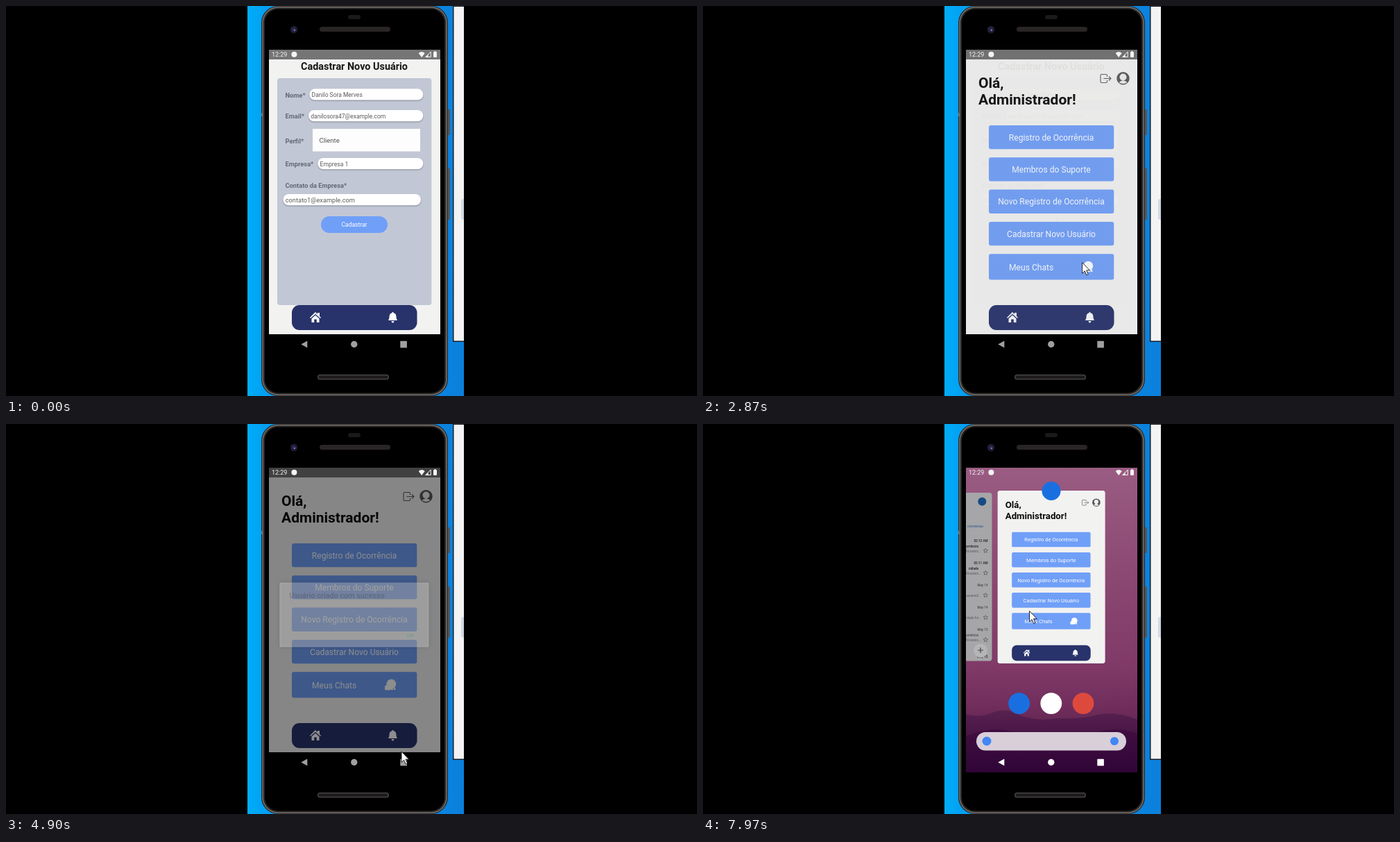
An HTML page with a canvas that plays this animation: 996x562 px, repeating every 8000 ms.

```html
<!DOCTYPE html>
<html lang="pt">
<head>
<meta charset="utf-8">
<style>
  html, body { margin: 0; width: 100%; height: 100%; overflow: hidden; background: #000; }
  canvas { display: block; }
</style>
</head>
<body>
<canvas id="stage" width="996" height="562"></canvas>
<script>
const c = document.getElementById('stage').getContext('2d');
const LOOP = 8000;
const BLUE = '#709ff8', NAVY = '#28326b', PAPER = '#f2f2f1';

const clamp = v => Math.max(0, Math.min(1, v));
const ramp = (t, a, b) => clamp((t - a) / (b - a));
const smooth = v => v * v * (3 - 2 * v);
const easeOut = v => 1 - (1 - v) ** 3;
const mix = (a, b, p) => a + (b - a) * p;

function box(x, y, w, h, r, fill) {
  c.beginPath();
  c.roundRect(x, y, w, h, r);
  c.fillStyle = fill;
  c.fill();
}
function disc(x, y, r, fill) {
  c.beginPath();
  c.arc(x, y, r, 0, 7);
  c.fillStyle = fill;
  c.fill();
}
function shape(d, x, y, fill, stroke, width = 1) {
  const path = new Path2D(d);
  c.save();
  c.translate(x, y);
  if (fill) { c.fillStyle = fill; c.fill(path); }
  if (stroke) { c.strokeStyle = stroke; c.lineWidth = width; c.stroke(path); }
  c.restore();
}
function text(str, x, y, size, color, weight = 400, align = 'left') {
  c.font = `${weight} ${size}px Roboto, sans-serif`;
  c.textAlign = align;
  c.fillStyle = color;
  c.fillText(str, x, y);
}
function faded(alpha, draw) {
  if (alpha <= 0) return;
  c.save();
  c.globalAlpha *= alpha;
  draw();
  c.restore();
}
function clipped(x, y, w, h, draw) {
  c.save();
  c.beginPath();
  c.rect(x, y, w, h);
  c.clip();
  draw();
  c.restore();
}
function gradient(x0, y0, x1, y1, ...stops) {
  const g = c.createLinearGradient(x0, y0, x1, y1);
  stops.forEach(([at, color]) => g.addColorStop(at, color));
  return g;
}

function desktop() {
  c.fillStyle = '#000';
  c.fillRect(0, 0, 996, 562);
  c.fillStyle = gradient(348, 0, 660, 0, [0, '#00adf7'], [.08, '#03a0f2'], [1, '#0b80dc']);
  c.fillRect(348, 0, 312, 562);
  c.fillStyle = '#151c26';
  c.fillRect(644, 0, 16, 484);
  c.fillStyle = '#f3f3f3';
  c.fillRect(645.5, 1, 14.5, 481.5);
  box(656, 278, 4, 30, [3, 0, 0, 3], '#d3d9e4');
}

function phone() {
  box(635, 149, 5, 37, 1, '#55575b');
  box(635, 234, 5, 74, 1, '#55575b');
  box(368, 0, 269, 562, 24, '#2b2929');
  box(369.3, 1, 266.4, 560, 23, '#77736f');
  box(370.8, 2.5, 263.4, 557, 21.5, '#2a2827');
  box(373, 4.5, 259, 553, 19.5, '#000');
  c.fillStyle = '#6b6b6b';
  c.fillRect(368, 154, 2, 5);
  box(493, 13, 18, 6, 3, '#1b191a');
  box(452, 30, 102, 7, 3.5, '#2a2525');
  disc(415, 34, 5.5, '#1a1a2b');
  disc(415, 34, 3, '#2c2a55');
  disc(416, 35, 1, '#8c96c8');
  box(449, 531, 103, 7.5, 3.5, '#454242');
  box(450.5, 532.5, 100, 4.5, 2, '#1d1b1b');
}

function tabBar() {
  box(412, 431, 180.5, 36, 11, NAVY);
  shape('M0 8L8 0L11 3V1H14V6L16 8L15 9L8 2.8L1 9ZM2.5 9.5L8 4.5L13.5 9.5V15H9.8V10.5H6.2V15H2.5Z', 438, 441, '#fff');
  shape('M7 0C7.8 0 8 .6 8 1.3C11 2 12 4 12 7C12 10 13 10.5 13.5 12H.5C1 10.5 2 10 2 7C2 4 3 2 6 1.3C6 .6 6.2 0 7 0ZM5 13H9Q8.8 15.5 7 15.5Q5.2 15.5 5 13Z', 550.5, 441, '#fff');
}

function field(label, x, y, w, value, size = 8.5) {
  c.save();
  c.shadowColor = 'rgba(60,65,85,.5)';
  c.shadowBlur = 2;
  c.shadowOffsetY = 1;
  box(x, y, w, 16.3, 8, '#fff');
  c.restore();
  text(label, 402.5, y + 12.4, 9.3, '#626977', 700);
  text(value, x + 3.3, y + 12, size, '#5c5c5c');
}

function spinner(t) {
  const turn = t - 2000;
  const phase = ((turn / 1333) % 1 + 1) % 1;
  const head = smooth(ramp(phase, .5, 1)), tail = smooth(ramp(phase, 0, .5));
  const spin = Math.floor(turn / 1333) * 4.5 + turn / 1333 * 1.35;
  c.beginPath();
  c.arc(502, 304.5, 8.3, spin + .9 + tail * 4.5, spin + 5.45 + head * 4.5);
  c.strokeStyle = '#747881';
  c.lineWidth = 2;
  c.stroke();
}

function formScreen(t) {
  c.fillStyle = PAPER;
  c.fillRect(379, 77, 247, 396);
  text('Cadastrar Novo Usuário', 502, 92, 14.4, '#161616', 700, 'center');
  box(391, 104, 222.3, 327, 4, '#c2c7d5');
  field('Nome*', 437.3, 119.3, 164, 'Danilo Sora Merves');
  field('Email*', 436, 150, 165.3, 'danilosora47@example.com');
  text('Perfil*', 402.5, 197.5, 9.3, '#626977', 700);
  box(442, 177, 155, 32.5, 0, '#fdfdfd');
  text('Cliente', 451.5, 197.3, 9.5, '#505050');
  field('Empresa*', 449.3, 219, 152, 'Empresa 1', 8.6);
  text('Contato da Empresa*', 402.5, 262.3, 9.3, '#626977', 700);
  field('', 399.5, 271, 198.5, 'contato1@example.com', 9.2);
  if (t < 1300) {
    faded(1 - .7 * ramp(t, 1120, 1250), () => {
      box(454, 303, 96, 24, 12, BLUE);
      text('Cadastrar', 502, 318, 8.5, '#fff', 400, 'center');
    });
  } else spinner(t);
  tabBar();
}

function homeScreen() {
  c.fillStyle = PAPER;
  c.fillRect(379, 77, 247, 396);
  text('Olá,', 397, 117.5, 21, '#0b0b0b', 700);
  text('Administrador!', 397, 142, 21, '#0b0b0b', 700);
  shape('M10 4V2Q10 .5 8.5 .5H2Q.5 .5 .5 2V11Q.5 12.5 2 12.5H8.5Q10 12.5 10 11V9M5 6.5H15.5M12.5 3.5L15.5 6.5L12.5 9.5', 572.5, 98, null, '#5c5c5c', 1.1);
  disc(605.5, 104.3, 9.2, '#55565b');
  disc(605.5, 102.5, 5, PAPER);
  shape('M-6 7Q0 1.5 6 7Q0 11 -6 7Z', 605.5, 103, PAPER);
  const labels = ['Registro de Ocorrência', 'Membros do Suporte', 'Novo Registro de Ocorrência', 'Cadastrar Novo Usuário'];
  labels.forEach((label, i) => {
    const y = 172 + i * 46.3;
    box(412, y, 180.3, 34.3, 3, BLUE);
    text(label, 502, y + 21.7, 12.1, '#fff', 400, 'center');
  });
  box(412, 357.2, 180.3, 37.3, 3, BLUE);
  text('Meus Chats', 441, 380.7, 12.1, '#fff');
  disc(555.3, 374.7, 6.9, '#fff');
  shape('M0 8.5V3L4 1L14 9V8L16 8.5L14 4L12 8.5Q10 9 8 8.2Q7 9.5 4 9Q2 9 0 8.5Z', 546, 374.5, '#fff');
  tabBar();
}

function dialog() {
  c.save();
  c.shadowColor = 'rgba(0,0,0,.5)';
  c.shadowBlur = 5;
  box(394.3, 228.5, 215.2, 93, 1.5, '#fdfdfd');
  c.restore();
  text('Usuário criado com sucesso', 408.5, 251, 10.8, '#333', 500);
  text('OK', 577.3, 307.3, 8, '#2a8f80', 500);
}

function wallpaper() {
  c.fillStyle = gradient(0, 63, 0, 502, [0, '#9a5c82'], [.4, '#894670'], [.65, '#803a68'], [.78, '#712e5c'], [1, '#45123f']);
  c.fillRect(379, 63, 247, 439);
  shape('M0 418Q20 424 38 416Q60 408 78 420Q105 429 130 424Q165 426 190 419Q215 413 247 426V502H0Z', 379, 0,
    gradient(0, 408, 0, 502, [0, '#5a2351'], [.5, '#451344'], [1, '#320539']));
  shape('M0 450Q40 432 75 446Q125 466 170 450Q215 432 247 446V502H0Z', 379, 0,
    gradient(0, 435, 0, 502, [0, '#430f42'], [1, '#300537']));
}

function mailCard(shift) {
  c.save();
  c.translate(shift, 0);
  box(340, 99, 76.5, 242.5, 4, '#a6a5a8');
  disc(402.3, 111.7, 6, '#164a83');
  text('CONVERSAS', 404, 149, 4, '#315e8d', 500, 'right');
  const mails = [['02:12 AM', 'ocorrência', 'foi assoc…'], ['02:11 AM', 'nidade', 'foi assoc…'],
    ['May 14', '', 'usuario2…'], ['May 14', '', 'criado foi…'], ['May 13', 'ocorrência', 'foi assoc…']];
  mails.forEach(([date, title, body], i) => {
    const y = 170 + i * 32.1, weight = i < 2 ? 700 : 400;
    text(date, 410.5, y, 4.6, '#333', weight, 'right');
    text(title, 397, y + 7.7, 4.6, '#333', weight, 'right');
    text(body, 400, y + 15, 4.5, '#555', 400, 'right');
    shape('M0 -3.3L.9 -1L3.3 -1L1.4 .5L2.1 2.9L0 1.5L-2.1 2.9L-1.4 .5L-3.3 -1L-.9 -1Z', 407.3, y + 12.5, null, '#555', .7);
  });
  text('May 13', 410.5, 337, 4.6, '#333', 700, 'right');
  disc(400, 326.5, 10, '#b5b4b7');
  shape('M-4 0H4M0 -4V4', 400, 326, null, '#444', 1.2);
  c.restore();
}

function recents(t) {
  const p = easeOut(ramp(t, 6760, 7240));
  const extras = easeOut(ramp(t, 6980, 7420));
  wallpaper();
  faded(extras, () => {
    c.translate(0, 40 * (1 - extras));
    disc(455.6, 402.6, 15.4, '#1a6fe0');
    disc(501.8, 402.6, 15.4, '#fff');
    disc(548, 402.6, 15.4, '#dd4a3d');
    box(394, 444, 216, 26.5, 13.2, '#d8cfd9');
    disc(409, 457, 6.5, '#4285f4');
    disc(593, 457, 6, '#4285f4');
  });
  mailCard(-60 * (1 - extras));
  faded(1 - p, () => {
    c.fillStyle = '#757575';
    c.fillRect(379, 63, 247, 14);
    c.fillStyle = '#000';
    c.fillRect(379, 473, 247, 29);
  });
  const scale = mix(1, .629, p);
  c.save();
  c.translate(mix(502.5, 502.1, p), mix(77, 96, p));
  c.scale(scale, scale);
  c.translate(-502.5, -77);
  c.beginPath();
  c.roundRect(379, 77, 247, 396, 6 * p);
  c.clip();
  homeScreen();
  c.restore();
  disc(502, 96.5, 13.5 * easeOut(ramp(t, 7150, 7400)), '#1a6fe0');
}

function statusIcons() {
  const white = '#f4f4f4';
  text('12:29', 383, 73.2, 9, white);
  disc(415.4, 69.7, 4, white);
  shape('M0 2Q4.5 -2 9 2L4.5 8Z', 594.7, 66, white);
  shape('M7.5 0V7.5H0Z', 604.7, 66, null, white, 1);
  shape('M4 4V7.5H.5Z', 604.7, 66, white);
  box(616, 66, 5, 8, 1, white);
  c.fillRect(617.5, 65, 2, 2);
}

function navButtons(t) {
  faded(ramp(t, 5500, 5600) * (1 - ramp(t, 6670, 6880)), () => {
    const w = mix(20, 63, easeOut(ramp(t, 5500, 5870)));
    box(573 - w / 2, 473, w, 29, 14.5, '#303030');
  });
  const level = 160 + 70 * ramp(t, 5500, 5870) + 25 * ramp(t, 6760, 7200);
  const tone = `rgb(${level},${level},${level})`;
  shape('M0 5L9 0V10Z', 425.3, 482.5, tone);
  disc(501.8, 487.5, 4.7, tone);
  box(568.3, 482.8, 9.6, 9.6, .5, tone);
}

// time, x, y of the pointer tip
const pointerPath = [
  [300, 664, 470], [800, 522, 330], [1000, 512, 314], [1280, 512, 314], [1700, 541, 378],
  [2650, 541, 378], [3300, 562, 347], [3500, 562, 347], [4250, 574, 304], [4520, 574, 304],
  [4670, 564.5, 323], [4900, 570, 472], [5070, 566, 496], [5320, 566, 496], [5340, 566.5, 494],
  [7000, 566.5, 494], [7850, 470.5, 269.5], [LOOP, 470.5, 269.5]
];
function pointer(t) {
  const next = pointerPath.findIndex(k => k[0] > t);
  if (next < 1) return;
  const [t0, x0, y0] = pointerPath[next - 1], [t1, x1, y1] = pointerPath[next];
  const p = smooth(ramp(t, t0, t1));
  shape('M0 0V15.5L3.6 12.2L6.2 18L8.6 17L6 11.2H10.8Z', mix(x0, x1, p), mix(y0, y1, p), '#fff', '#111', .9);
}

function appScreen(t) {
  c.fillStyle = '#757575';
  c.fillRect(379, 63, 247, 14);
  if (t < 2880) formScreen(t);
  faded(ramp(t, 2700, 2880), homeScreen);
  const dim = .6 * ramp(t, 2860, 3060) * (1 - ramp(t, 4850, 5050));
  c.fillStyle = `rgba(0,0,0,${dim})`;
  c.fillRect(379, 63, 247, 410);
  faded(ramp(t, 2900, 3060) * (1 - ramp(t, 4800, 4945)), dialog);
}

function draw(t) {
  desktop();
  phone();
  clipped(379, 63, 247, 439, () => {
    if (t < 6760) appScreen(t);
    else recents(t);
    statusIcons();
    navButtons(t);
  });
  clipped(348, 0, 312, 562, () => pointer(t));
}

const start = performance.now();
function tick() {
  draw((performance.now() - start) % LOOP);
  requestAnimationFrame(tick);
}
tick();
</script>
</body>
</html>
```
